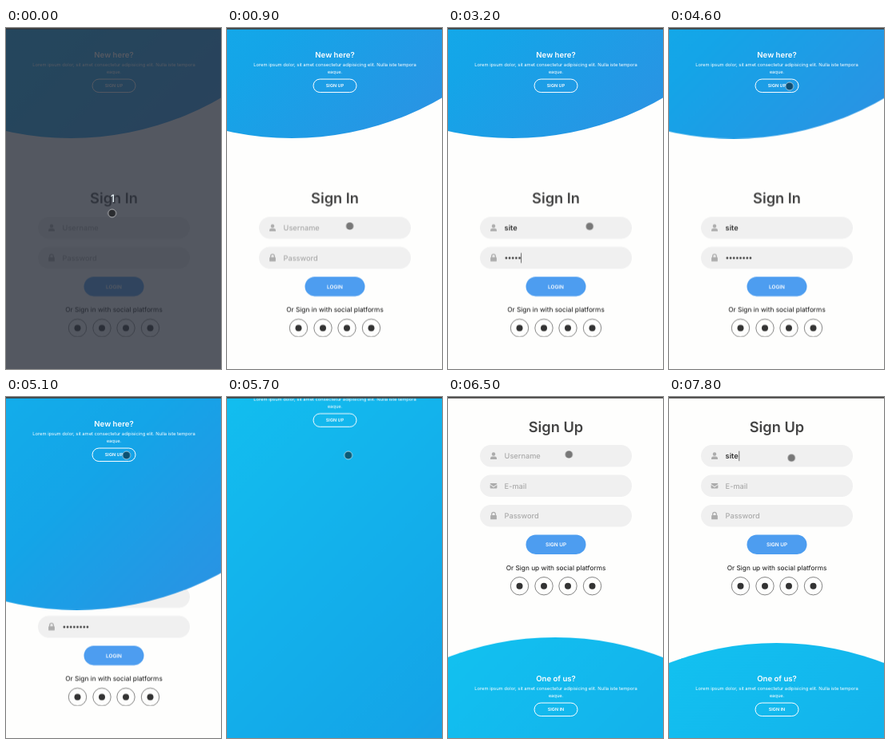
Write an HTML page that moves like this. It is 269 px wide and 427 px high and loops after 8000 ms.

```html
<!DOCTYPE html>
<html lang="en">
<head>
<meta charset="utf-8">
<title>Sign in and sign up</title>
<style>
  html, body { margin: 0; width: 100%; height: 100%; overflow: hidden; background: #fefefd; }
  svg { display: block; width: 100vw; height: 100vh; }
  text { font-family: Inter, "Open Sans", sans-serif; text-rendering: geometricPrecision; white-space: pre; }

  .title { font-size: 18.2px; font-weight: 600; fill: #444; }
  .heading { font-size: 9.6px; font-weight: 600; fill: #fff; }
  .copy { font-size: 5.8px; fill: #fff; }
  .outline-label { font-size: 5.5px; font-weight: 600; fill: #fff; }
  .button-label { font-size: 6.4px; font-weight: 600; fill: #fff; }
  .social-label { font-size: 8.3px; fill: #111; }
  .hint { font-size: 9.2px; font-weight: 500; fill: #aaa; }
  .value { font-size: 9.2px; font-weight: 600; fill: #333; }

  .field { fill: #f0f0f0; }
  .button { fill: #4d9df0; }
  .outline { fill: none; stroke: #fff; }
  .ring { fill: none; stroke: #333; stroke-width: .6; }
  .dark { fill: #333; }
  .icon { fill: #acacac; }

  .moving { animation: 8s linear infinite; }
  #disc { animation-name: sweep; animation-timing-function: ease-in-out; }
  #forms { animation-name: rise; animation-timing-function: ease-in-out; }
  #signIn { animation-name: fadeOut; }
  #signUp { animation-name: fadeIn; }
  #leftPanel { animation-name: leave; animation-timing-function: ease-in-out; }
  #rightPanel { animation-name: enter; animation-timing-function: ease-in-out; }
  #pointer { animation-name: point; }
  #shade { animation-name: clear; animation-timing-function: step-end; }

  @keyframes sweep {
    0%, 57.04% { transform: translate(0, 0); }
    82.9%, 100% { transform: translate(53.5px, 920px); }
  }
  @keyframes rise {
    0%, 67.37% { transform: translateY(157.5px); }
    80.31%, 100% { transform: translateY(0); }
  }
  @keyframes fadeOut { 0%, 66.1% { opacity: 1; } 68.7%, 100% { opacity: 0; } }
  @keyframes fadeIn { 0%, 66.1% { opacity: 0; } 68.7%, 100% { opacity: 1; } }
  @keyframes leave {
    0%, 66.62% { transform: translateY(0); }
    79.09%, 100% { transform: translateY(-150px); }
  }
  @keyframes enter {
    0%, 66.62% { transform: translateY(150px); }
    79.09%, 100% { transform: translateY(0); }
  }
  @keyframes clear { 0% { opacity: 1; } 1.25% { opacity: .5; } 2.5%, 100% { opacity: 0; } }
  @keyframes point {
    0%, 1.25% { transform: translate(132.7px, 232px); }
    2.5%, 6.1% { transform: translate(138px, 230px); }
    6.25%, 8.6% { transform: translate(149.5px, 249px); }
    8.75% { transform: translate(153px, 235px); }
    10% { transform: translate(162px, 217px); }
    11.25% { transform: translate(153.6px, 248px); }
    13.75%, 16.1% { transform: translate(153px, 252px); }
    16.25%, 18.6% { transform: translate(153.5px, 250px); }
    18.75% { transform: translate(166px, 249px); }
    20%, 40% { transform: translate(177.2px, 248.6px); }
    44% { transform: translate(187px, 190px); }
    50% { transform: translate(171px, 87px); }
    51.25%, 53.6% { transform: translate(167px, 72px); }
    57%, 63.75% { transform: translate(150.7px, 73px); }
    71.25% { transform: translate(151.7px, 73px); }
    76.25%, 86.1% { transform: translate(151.3px, 72px); }
    86.25%, 100% { transform: translate(153.2px, 76.2px); }
  }
</style>
</head>
<body>
<svg viewBox="0 0 269 427" preserveAspectRatio="none">
  <defs>
    <linearGradient id="sky" x1="0" y1="0" x2="1" y2="1">
      <stop offset="0" stop-color="#12cbf3"/>
      <stop offset=".65" stop-color="#14a5e8"/>
      <stop offset="1" stop-color="#3a86e0"/>
    </linearGradient>
  </defs>
  <g id="forms" class="moving">
    <g id="signIn" class="moving"></g>
    <g id="signUp" class="moving"></g>
  </g>
  <circle id="disc" class="moving" cx="81" cy="-237" r="375" fill="url(#sky)"/>
  <g id="leftPanel" class="moving"></g>
  <g id="rightPanel" class="moving"></g>
  <rect width="269" height="1.7" fill="#434240"/>
  <g id="shade" class="moving">
    <rect y="1" width="269" height="426" fill="#2a2f3a" opacity=".8"/>
    <text x="133.5" y="213.5" dy=".36em" text-anchor="middle" font-size="13" font-weight="500" fill="#e8f4f8">1</text>
  </g>
  <circle id="pointer" class="moving" r="5" fill="#000" fill-opacity=".5" stroke="#fff" stroke-opacity=".65" stroke-width=".9"/>
</svg>
<script>
const LOOP = 8000;
const byId = id => document.getElementById(id);
const rules = [];

const label = (cls, x, y, text, anchor = 'middle') =>
  `<text class="${cls}" x="${x}" y="${y}" dy=".36em" text-anchor="${anchor}">${text}</text>`;

const pill = (cls, y, width, height) =>
  `<rect class="${cls}" x="${135 - width / 2}" y="${y - height / 2}" width="${width}" height="${height}" rx="${height / 2}"/>`;

// Shows markup only between two moments of the loop.
function during(from, to, markup) {
  const name = `show${rules.length}`;
  rules.push(`@keyframes ${name} { 0% { opacity: 0 } ${from / LOOP * 100}% { opacity: 1 } ${to / LOOP * 100}% { opacity: ${to < LOOP ? 0 : 1} } }`);
  return `<g style="animation: ${name} ${LOOP}ms step-end infinite">${markup}</g>`;
}

const icons = {
  user: '<circle cy="-2.2" r="2.2"/><path d="M-4 4.3V3.2Q-4 .8-1.6.8H1.6Q4 .8 4 3.2V4.3Z"/>',
  mail: '<path d="M-4.4-2.3Q-4.4-3.3-3.4-3.3H3.4Q4.4-3.3 4.4-2.3L0 .8ZM-4.4-1.1L0 2L4.4-1.1V2.4Q4.4 3.4 3.4 3.4H-3.4Q-4.4 3.4-4.4 2.4Z"/>',
  lock: '<rect x="-3.9" y="-.6" width="7.8" height="5.2" rx=".9"/><path d="M-2.3 0V-2.1A2.3 2.3 0 0 1 2.3-2.1V0" fill="none" stroke="#acacac" stroke-width="1.3"/>'
};

const field = (y, icon, content) =>
  pill('field', y, 190, 27.5) +
  `<g class="icon" transform="translate(57 ${y})">${icons[icon]}</g>` + content;

const hint = (y, text) => label('hint', 70.6, y, text, 'start');
const value = (y, text) => label('value', 70.6, y, text, 'start');
const caret = (x, y) => `<rect class="dark" x="${x}" y="${y - 6}" width=".7" height="12.5"/>`;

const PITCH = 4.15;
const dots = (y, count) => Array.from({ length: count }, (_, i) =>
  `<circle class="dark" cx="${72.9 + i * PITCH}" cy="${y + .3}" r="1.35"/>`).join('');

// Focus, one blink, then the name in two bursts.
const typedName = (y, focus, first, second, blur) =>
  during(0, first, hint(y, 'Username')) +
  during(first, second, value(y, 'si')) +
  during(second, LOOP, value(y, 'site')) +
  during(focus, focus + 500, caret(70.5, y)) +
  during(first, second, caret(78.8, y)) +
  during(second, blur, caret(87.5, y));

function typedPassword(y) {
  const steps = [[2900, 1], [3000, 3], [3200, 5], [3300, 6], [3400, 8]];
  const typed = steps.map(([from, count], i) => {
    const last = i === steps.length - 1;
    const to = last ? LOOP : steps[i + 1][0];
    return during(from, to, dots(y, count)) +
      during(from, last ? 3900 : to, caret(70.6 + count * PITCH, y));
  }).join('');
  return during(0, 2900, hint(y, 'Password')) + typed +
    during(2600, 2900, caret(70.5, y)) +
    during(4400, 4560, caret(70.6 + 8 * PITCH, y));
}

const formEnd = (y, button, text) =>
  pill('button', y, 75, 24.5) + label('button-label', 135, y, button) +
  label('social-label', 135, y + 28.9, text) +
  [89.5, 120, 150, 180.5].map(x =>
    `<circle class="ring" cx="${x}" cy="${y + 52}" r="11.2"/><circle class="dark" cx="${x}" cy="${y + 52}" r="4"/>`).join('');

const panel = (y, title, button) =>
  label('heading', 135, y, title) +
  label('copy', 135, y + 12.8, 'Lorem ipsum dolor, sit amet consectetur adipisicing elit. Nulla iste tempora') +
  label('copy', 135, y + 21.3, 'eaque.') +
  pill('outline', y + 38.8, 54, 16.5) + label('outline-label', 135, y + 38.8, button);

byId('signIn').innerHTML =
  label('title', 135, 55.8, 'Sign In') +
  field(92.7, 'user', typedName(92.7, 1300, 2100, 2300, 2600)) +
  field(130.2, 'lock', typedPassword(130.2)) +
  formEnd(166.2, 'LOGIN', 'Or Sign in with social platforms');

byId('signUp').innerHTML =
  label('title', 135, 37, 'Sign Up') +
  field(73.7, 'user', typedName(73.7, 6900, 7600, 7800, LOOP)) +
  field(111.2, 'mail', hint(111.2, 'E-mail')) +
  field(148.7, 'lock', hint(148.7, 'Password')) +
  formEnd(184.7, 'SIGN UP', 'Or Sign up with social platforms');

byId('leftPanel').innerHTML = panel(33.5, 'New here?', 'SIGN UP');
byId('rightPanel').innerHTML = panel(352.5, 'One of us?', 'SIGN IN');

const sheet = document.createElement('style');
sheet.textContent = rules.join('\n');
document.head.append(sheet);
</script>
</body>
</html>
```
